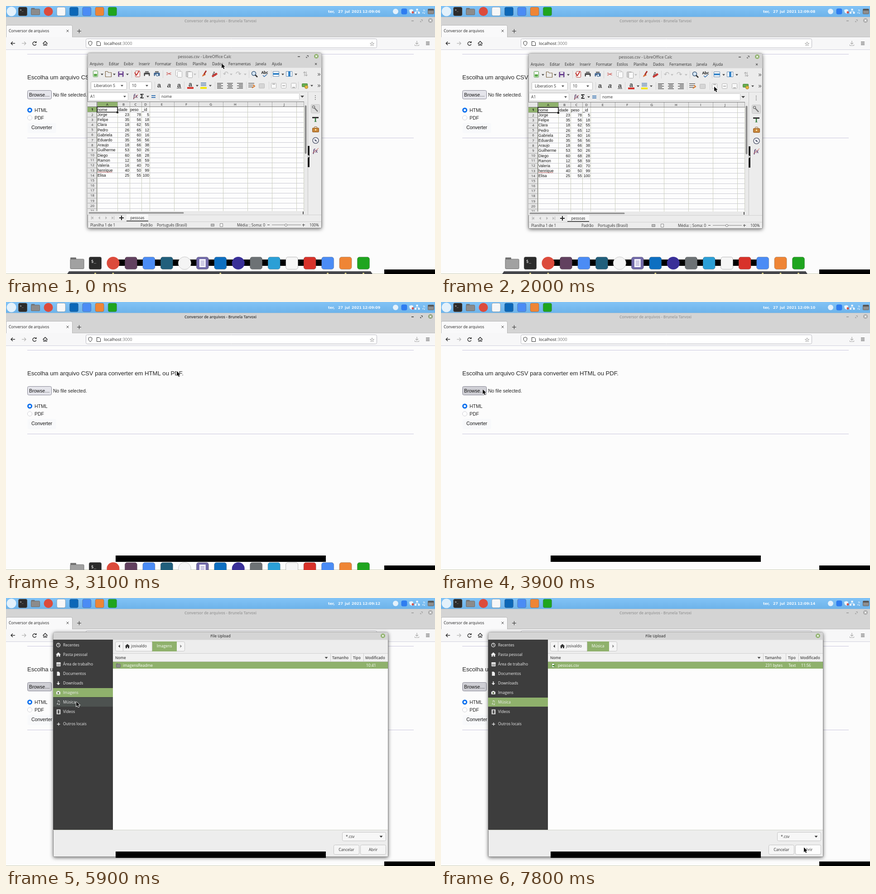
These frames come from a looping animation (947x592 px, 8000 ms). An HTML page with a canvas:

```html
<!DOCTYPE html>
<html lang="pt-BR">
<head>
<meta charset="utf-8">
<style>
html, body { margin: 0; width: 100%; height: 100%; overflow: hidden; background: #fcfcfc; }
canvas { display: block; }
</style>
</head>
<body>
<canvas id="stage" width="947" height="592"></canvas>
<script>
const W = 947, H = 592, LOOP = 8000;
const UI = '"Open Sans", "Noto Sans", sans-serif';
const ARIAL = '"Liberation Sans", Arial, sans-serif';
const SYM = '"DejaVu Sans", sans-serif';
const GREEN = '#8fb16c', DARK = '#2e2e2e', GREY = '#a9a9a9';
const stage = document.getElementById('stage').getContext('2d');
let g = stage;

// Drawing helpers; text is placed by its visual centre line.
function rect(x, y, w, h, fill) { g.fillStyle = fill; g.fillRect(x, y, w, h); }
function box(x, y, w, h, r, fill, line, lw = 1) {
  g.beginPath();
  g.roundRect(x + .5, y + .5, w - 1, h - 1, r);
  if (fill) { g.fillStyle = fill; g.fill(); }
  if (line) { g.strokeStyle = line; g.lineWidth = lw; g.stroke(); }
}
function disc(x, y, r, fill, line, lw = 1) {
  g.beginPath();
  g.arc(x, y, r, 0, 7);
  if (fill) { g.fillStyle = fill; g.fill(); }
  if (line) { g.strokeStyle = line; g.lineWidth = lw; g.stroke(); }
}
function path(points, line, lw = 1, fill) {
  g.beginPath();
  points.forEach(([x, y]) => g.lineTo(x, y));
  if (fill) { g.closePath(); g.fillStyle = fill; g.fill(); }
  if (line) { g.strokeStyle = line; g.lineWidth = lw; g.stroke(); }
}
function text(s, x, y, size, color = DARK, align = 'left', font = UI, style = '') {
  g.font = `${style} ${size}px ${font}`;
  g.textAlign = align;
  g.fillStyle = color;
  g.fillText(s, x, Math.round(y + size * .35));
}
const sym = (s, x, y, size, color = DARK) => text(s, x, y, size, color, 'center', SYM);
const down = (x, y, c = '#444', r = 3) => path([[x - r, y - r / 2], [x + r, y - r / 2], [x, y + r / 2 + .5]], null, 0, c);
const side = (x, y, d, c) => path([[x + d * 2, y], [x - d * 1.5, y - 3.5], [x - d * 1.5, y + 3.5]], null, 0, c);
const vline = (x, y0, y1, c) => rect(x, y0, 1, y1 - y0, c);

function layer(draw) {
  const c = document.createElement('canvas');
  c.width = W; c.height = H;
  g = c.getContext('2d');
  draw();
  g = stage;
  return c;
}

function frame(x, y, w, h, fill) {
  g.save();
  g.shadowColor = 'rgba(0,0,0,.6)';
  g.shadowBlur = 9;
  g.shadowOffsetY = 2;
  box(x, y, w, h, [4, 4, 1, 1], fill);
  g.restore();
  box(x, y, w, h, [4, 4, 1, 1], null, '#8a8a8a');
}
function windowButtons(min, max, y, c) {
  rect(min - 2, y - 1, 5, 1.5, c);
  path([[max - 1, y - 2.5], [max + 2, y - 2.5], [max + 2, y + .5]], c, 1.2);
  path([[max - 2, y], [max - 2, y + 2], [max, y + 2]], c, 1.2);
}
function closeButton(x, y, c = GREEN) {
  disc(x, y, 5, c);
  path([[x - 2, y - 2], [x + 2, y + 2]], '#fff', 1.2);
  path([[x + 2, y - 2], [x - 2, y + 2]], '#fff', 1.2);
}
function folder(x, y, w, h, c = '#8b8b8b') {
  box(x, y, w * .45, h * .4, 1, '#6e6e6e');
  box(x, y + h * .14, w, h * .86, 1.5, c, '#6f6f6f');
}
function house(x, y, c) {
  path([[x, y - 5], [x + 5.5, y], [x + 4, y], [x + 4, y + 4.5], [x + 1, y + 4.5], [x + 1, y + 1.5],
    [x - 1, y + 1.5], [x - 1, y + 4.5], [x - 4, y + 4.5], [x - 4, y], [x - 5.5, y]], null, 0, c);
}
function terminal(x, y, s) {
  box(x - s / 2, y - s / 2, s, s, 3, '#2b2b2b', '#555');
  text(s > 22 ? '$_' : '>_', x - s * .33, y - s * .17, s * .34, '#fff', 'left', '"DejaVu Sans Mono", monospace');
}
const tile = (x, y, s, c) => box(x - s / 2, y - s / 2, s, s, s * .17, c, 'rgba(70,70,70,.35)');

function panel(second) {
  const sky = g.createLinearGradient(0, 0, 0, 24);
  sky.addColorStop(0, '#82c3f6');
  sky.addColorStop(1, '#6db3ea');
  rect(0, 0, W, 24, sky);
  disc(12, 12, 10.5, '#e3f1fb');
  terminal(37, 12, 20);
  folder(55, 4, 20, 16);
  disc(93.5, 12, 10, '#dc4b3c');
  ['#f7f7f7', '#0c67b7', '#4b8cf5', '#ef8535', '#1fa51f'].forEach((c, i) => tile(121.7 + i * 28.3, 12, 20, c));
  const ss = String(second).padStart(2, '0');
  [['ter,', 711], ['27', 733], ['jul', 748], ['2021', 763], [`12:09:${ss}`, 787]].forEach(
    ([s, x]) => text(s, x, 12, 7.9, '#f4faff', 'left', SYM, 'bold'));
  disc(860, 12, 6, '#e4f1fb');
  box(872, 5, 14, 14, 4, '#2f7df0');
  path([[895, 7], [899, 8.5], [898, 14], [895, 17], [891, 14], [890, 8.5]], null, 0, '#eef6fc');
  disc(898, 14, 2.5, '#d9544c');
  [[907, 7], [903.5, 14], [911, 14]].forEach(([x, y]) => rect(x - 1.5, y - 1, 4, 4, '#eef6fc'));
  path([[904.5, 14], [904.5, 12], [911.5, 12], [911.5, 14]], '#eef6fc');
  sym('♫', 922, 12, 11, '#eef6fc');
  box(931, 6, 14, 12, 1, '#8d8d8d', '#666');
  rect(932, 7, 12, 3, '#555');
}

function browser(focused, hover) {
  const ink = focused ? '#333' : '#989898';
  rect(0, 24, W, 45, '#d4d4d4');
  rect(0, 24, W, 1, '#c3c9cd');
  text('Conversor de arquivos - Brunela Tarvoxi', 473.5, 33, 8.3, ink, 'center', UI, '600');
  windowButtons(897, 917, 33, ink);
  closeButton(937, 32, focused ? '#8d9f78' : '#aaa');
  box(0, 42, 147, 28, [3, 3, 0, 0], '#f9f9fa', '#b5b5b5');
  text('Conversor de arquivos', 6, 55, 8.5, '#222');
  path([[133.5, 52.5], [138.5, 57.5]], '#444');
  path([[138.5, 52.5], [133.5, 57.5]], '#444');
  rect(157, 55, 9, 1, DARK);
  vline(161, 51, 60, DARK);
  rect(0, 69, W, 27, '#f7f7f8');
  rect(147, 68, 800, 1, '#bdbdbd');
  rect(0, 96, W, 1, '#d0d0dc');
  const arrow = (x, d, c) => {
    path([[x - 4.5, 82.5], [x + 4.5, 82.5]], c, 1.3);
    path([[x + d * .7, 78.7], [x + d * 4.5, 82.5], [x + d * .7, 86.3]], c, 1.3);
  };
  arrow(15.5, -1, '#222');
  arrow(39.5, 1, '#b5b5b5');
  g.beginPath(); g.arc(63, 83, 4, .4, 5.6); g.strokeStyle = '#222'; g.lineWidth = 1.3; g.stroke();
  path([[67.5, 77.5], [67.5, 81.5], [63.5, 81.5]], null, 0, '#222');
  path([[81.5, 83], [86.5, 78], [91.5, 83]], '#222', 1.3);
  path([[83, 82], [83, 87], [85.5, 87], [85.5, 84], [87.5, 84], [87.5, 87], [90, 87], [90, 82]], '#222', 1.1);
  box(176, 72, 643, 21, 3, '#fff', '#b9b9c0');
  path([[186, 77.5], [190, 79.5], [189.5, 84], [186, 88], [182.5, 84], [182, 79.5], [186, 77.5]], '#333');
  path([[200.5, 78.5], [206, 78.5], [208.5, 81], [208.5, 87.5], [200.5, 87.5], [200.5, 78]], '#333');
  text('localhost', 216, 83, 9.2, '#222');
  text(':3000', 255, 83, 9.2, '#777');
  sym('☆', 808, 83, 13, '#333');
  path([[907, 77], [907, 84]], '#aaa', 1.2);
  path([[904, 81.5], [907, 84.5], [910, 81.5]], '#aaa', 1.2);
  path([[902.5, 85], [902.5, 87.5], [911.5, 87.5], [911.5, 85]], '#aaa');
  [79, 82, 85].forEach(y => rect(927, y, 8, 1, '#333'));

  rect(0, 97, W, 495, '#fcfcfc');
  [106, 291].forEach(y => rect(47, y, 853, 1, '#c9c6dd'));
  const page = (s, x, y, size = 10.5, c = '#222') => text(s, x, y, size, c, 'left', ARIAL);
  page('Escolha um arquivo CSV para converter em HTML ou PDF.', 47, 157.5, 13.1);
  box(47, 186, 54, 20, 3, hover ? '#cfcfd5' : '#e5e5eb', '#8b8b98');
  page('Browse…', 51, 196.5, 10.5, '#111');
  page('No file selected.', 104, 196.5);
  disc(52.5, 230, 4, '#fff', '#0b6fee', 3);
  disc(52.5, 247, 5, '#fff', '#cfcfd5');
  page('HTML', 63, 230);
  page('PDF', 63, 247);
  box(47, 258, 64, 23, 3, '#f8f9fb');
  page('Converter', 56, 268.7, 10.5, '#111');
  rect(0, 591, W, 1, '#c9cdb4');
}

const PEOPLE = 'Jorge,23,78,5;Felipe,35,56,18;Clara,18,62,55;Pedro,26,65,12;Gabriela,25,60,16;Eduardo,35,56,56;Araujo,18,66,38;Guilherme,53,50,26;Diego,60,68,28;Ramon,12,58,59;Valeria,16,40,70;henrique,40,50,99;Elisa,25,55,100'
  .split(';').map(r => r.split(','));
const COLS = [201, 246, 273, 299, 317, 371, 425, 479, 533, 587, 641, 657];
const ROW = 11.18;

function toolbars() {
  const page = (x, y, c, fill = '#fafafa') => box(x - 5, y - 7, 11, 14, 1, fill, c);
  // File, print and clipboard
  page(197, 150, '#4a9a3a'); rect(194, 150, 7, 5, '#56a845');
  path([[219.5, 156], [219.5, 144.5], [224, 144.5], [226, 147], [232.5, 147], [232.5, 156.5], [219, 156.5]], '#7d6644', 1.2);
  box(247, 144, 13, 13, 1, '#69418f'); rect(250, 145, 7, 4, '#eee'); rect(250, 152, 7, 5, '#ddd');
  page(290, 150, '#b8463e'); path([[284, 147], [288, 153], [294, 143]], '#c32f2b', 2);
  for (const [x, c] of [[311, '#444'], [333, '#395f8c']]) {
    box(x - 7, 147, 14, 8, 1, c); rect(x - 4, 144, 8, 3, '#777'); rect(x - 4, 151, 8, 6, '#f5f5f5');
  }
  disc(334, 152, 3, '#cde2f3', '#274c77');
  sym('✂', 360, 150, 15, '#c8413c');
  page(379, 148, '#b5b5b5'); page(383, 151, '#b5b5b5');
  box(397, 144, 11, 13, 1, '#cfcfcf', GREY); page(406, 152, GREY);
  path([[433, 156], [441, 152], [439, 149], [434, 152]], null, 0, '#d96d36'); path([[437, 151], [442, 143]], '#a9342c', 3);
  text('A', 455, 149, 13, '#333', 'left', ARIAL); path([[455, 156], [466, 149]], '#c83a36', 4);
  sym('↶', 485, 150, 15, '#b9b9b9'); sym('↷', 513, 150, 15, '#b9b9b9');
  disc(547, 149, 4.5, '#d5e6f5', '#3c5b7c', 1.5); path([[550, 152], [555, 157]], '#333', 2.5);
  text('Abc', 571, 147, 8.3, '#222', 'center', UI, 'bold'); path([[567, 153], [570, 156], [576, 151]], '#3370b0', 1.5);
  for (const x of [596, 625]) {
    box(x - 7, 144, 14, 12, 0, '#fff', '#6487ab');
    x < 600 ? rect(x - 7, 148, 14, 4, '#3a87c9') : rect(x - 2, 144, 5, 12, '#3a87c9');
  }
  sym('⇅', 661, 150, 14, GREY);
  [212, 239, 268, 611, 640].forEach(x => down(x, 151));
  [417, 497, 528].forEach(x => down(x, 151, '#bbb'));
  [277, 346, 425, 473, 536, 585].forEach(x => vline(x, 142, 159, '#d4d4d4'));
  // Formatting
  box(187, 167, 80, 18, 2, '#fff', '#bdbdbd'); text('Liberation S', 194, 176, 8.5); down(256, 176);
  box(272, 167, 50, 18, 2, '#fff', '#bdbdbd'); text('10', 278, 176, 8.5); down(311, 176);
  ['bold', 'italic bold', 'bold'].forEach((s, i) => text('a', 338 + i * 22, 175, 15, '#4a4a4a', 'center', ARIAL, s));
  rect(377, 181, 10, 1, '#444');
  text('a', 407, 173, 14, '#4a4a4a', 'center', ARIAL, 'bold'); rect(400, 179, 14, 4, '#d4362e');
  [169, 172, 175].forEach(y => rect(430, y, 12, 1.4, '#527ba8')); rect(429, 179, 14, 4, '#f3e500');
  [472, 494, 516].forEach((x, n) => {
    for (let i = 0; i < 5; i++) rect(x - 6 + (i % 2 ? n * 2 : 0), 170 + i * 2.8, i % 2 ? 9 : 13, 1.2, '#444');
  });
  [170, 174, 178].forEach(y => rect(535, y, 13, 1.3, '#555')); path([[545, 174], [549, 177], [543, 181]], '#e07b29', 2);
  box(558, 171, 13, 11, 1, '#d5d5d5', '#bcbcbc');
  [591, 613, 635].forEach((x, i) => { box(x - 6, 170, 12, 12, 1, '#f8f8f8', '#b5b5b5'); rect(x - 3, 172 + i * 3.5, 6, 1.2, '#888'); });
  box(653, 171, 13, 8, 1, '#67ad50', '#48853a'); disc(663, 179, 3.5, '#e7b844', '#a88227');
  [422, 451, 675].forEach(x => down(x, 176));
  [328, 393, 461, 530, 580, 645].forEach(x => vline(x, 167, 184, '#d4d4d4'));
  [150, 175].forEach(y => text('»', 691, y, 15, '#555', 'center'));
}

function drawCalc() {
  frame(180, 103, 517, 388, '#ececec');
  box(180, 103, 517, 34, [4, 4, 0, 0], '#d5d5d5');
  text('pessoas.csv - LibreOffice Calc', 438.5, 112, 8.7, '#444', 'center');
  windowButtons(646, 665, 112, '#444');
  closeButton(685, 111);
  [['Arquivo', 185], ['Editar', 227], ['Exibir', 260], ['Inserir', 293], ['Formatar', 329], ['Estilos', 375], ['Planilha', 412],
    ['Dados', 455], ['Ferramentas', 491], ['Janela', 551], ['Ajuda', 587]].forEach(([s, x]) => text(s, x, 128.5, 8.3));
  sym('✕', 684, 128, 8);
  toolbars();
  rect(181, 189, 515, 1, '#d3d3d3');

  box(181, 191, 89, 18, 2, '#fff', '#c9c9c9');
  text('A1', 186, 200.5, 8.5);
  down(262, 200);
  text('fx', 286, 199, 12, '#59436c', 'center', '"Liberation Serif", serif', 'italic bold');
  path([[281, 205], [291, 196]], '#c34b45');
  text('Σ', 300, 199, 14, '#333', 'center', SYM, 'bold');
  down(313, 200);
  rect(321, 197, 9, 2, '#3e78b5'); rect(321, 201, 9, 2, '#3e78b5');
  box(338, 192, 310, 16, 1, '#fff', '#c9c9c9');
  text('nome', 343, 200, 8.5);
  down(654, 200, '#444', 4);

  g.save();
  g.beginPath(); g.rect(180, 211, 478, 242); g.clip();
  rect(201, 223, 457, 230, '#fdfdfd');
  rect(180, 211, 478, 12, '#e6e6e6');
  rect(180, 223, 21, 230, '#e6e6e6');
  rect(201, 211, 45, 12, GREEN);
  rect(180, 223, 21, 11, GREEN);
  for (let i = 1; i <= 21; i++) {
    const y = Math.round(223 + i * ROW);
    rect(201, y, 457, 1, '#c9c9d2');
    rect(180, y, 21, 1, '#aaa');
    text(i, 190.5, 228.7 + (i - 1) * ROW, 7.8, i === 1 ? '#111' : '#333', 'center', UI, i === 1 ? 'bold' : '');
  }
  COLS.forEach((x, i) => {
    vline(x, 223, 453, '#cdd0c0');
    vline(x, 211, 223, '#aaa');
    if (i < 10) text('ABCDEFGHIJ'[i], (x + COLS[i + 1]) / 2, 217.5, 7.8, '#222', 'center');
  });
  rect(180, 211, 478, 1, '#777'); rect(180, 222, 478, 1, '#777'); vline(200, 211, 453, '#777');
  const cell = (s, x, row, align) => text(s, x, 228.9 + row * ROW, 8.6, '#111', align, ARIAL);
  ['nome', 'idade', 'peso', '_id'].forEach((s, i) => cell(s, COLS[i] + 1, 0, 'left'));
  PEOPLE.forEach((person, r) => person.forEach(
    (s, i) => cell(s, i ? COLS[i + 1] - 1 : 202, r + 1, i ? 'right' : 'left')));
  path(Array.from({ length: 18 }, (_, i) => [202 + i * 1.9, 366.5 + i % 2]), '#d9564e', .8);
  g.strokeStyle = '#111'; g.lineWidth = 1.5; g.strokeRect(201, 223, 45, 11.5);
  rect(244, 233, 4, 4, '#111');
  g.restore();

  rect(658, 211, 8, 242, '#e9e9e9');
  box(659, 219, 5, 108, 2, '#8d8d8d');
  rect(180, 453, 486, 8, '#e9e9e9');
  box(182, 455, 211, 4, 2, '#8d8d8d');
  rect(655, 454, 2, 6, '#555');
  vline(666, 190, 461, '#c4c4c4');
  rect(666, 309, 4, 47, '#1c1c1c');
  side(668, 332, 1, '#fff');

  sym('⋮', 683, 202, 12);
  box(673, 217, 20, 20, 2, '#dcdcdc', '#c5c5c5');
  path([[678, 222], [688, 233]], '#777', 2.5); disc(679, 223, 2.5, '#eee', '#777', 1.5);
  text('T', 683, 250, 16, '#347f3f', 'center', '"Liberation Serif", serif', 'bold'); rect(676, 245, 14, 3, '#333');
  box(676, 269, 15, 10, 1, '#c6843a', '#8d5920'); box(680, 266, 7, 4, 1, null, '#8d5920'); rect(682, 272, 3, 3, '#ffe3a0');
  disc(683.5, 297, 6.5, '#f4f4f8', '#5b6175', 1.5);
  path([[680.5, 294], [685, 296], [686.5, 300], [682, 298]], null, 0, '#5b6175');
  text('fx', 683, 319, 13, '#5d4374', 'center', '"Liberation Serif", serif', 'italic bold'); path([[677, 325], [690, 314]], '#c34b45');

  rect(181, 461, 515, 1, '#d0d0d0');
  [[191, -1], [206, -1], [221, 1], [235, 1]].forEach(([x, d]) => side(x, 468, d, '#b4b4b4'));
  vline(188, 464, 472, '#b4b4b4'); vline(238, 464, 472, '#b4b4b4');
  rect(250, 467, 10, 2, '#222'); rect(254, 463, 2, 10, '#222');
  rect(266, 461, 48, 14, '#f9f9f9'); rect(266, 474, 48, 1.5, '#222');
  text('pessoas', 290, 468, 8.2, '#222', 'center');
  rect(181, 476, 515, 1, '#d0d0d0');
  [['Planilha 1 de 1', 186], ['Padrão', 297], ['Português (Brasil)', 333], ['Média: ; Soma: 0', 510], ['100%', 670]]
    .forEach(([s, x]) => text(s, x, 484, 8.1));
  box(452, 481, 8, 6, 0, '#bbb', '#888'); box(472, 480, 7, 8, 0, '#f8f8f8', '#888');
  rect(577, 483, 5, 1, '#444'); rect(587, 483, 64, 1, '#888'); disc(618, 484, 2.5, '#fff', '#777');
  rect(654, 483, 6, 1, '#444'); vline(656, 481, 487, '#444');
}

const PLACES = ['Recentes', 'Pasta pessoal', 'Área de trabalho', 'Documentos', 'Downloads', 'Imagens', 'Música', 'Vídeos', 'Outros locais'];
const placeY = i => i === 8 ? 278.5 : 104 + i * 21.07;

function placeIcon(i, x, y, c = '#eee') {
  if (i === 0) { disc(x, y, 4, null, c, 1.3); path([[x, y - 2.5], [x, y], [x + 2, y + 1]], c); }
  if (i === 1) house(x, y, c);
  if (i === 2) { box(x - 4, y - 4, 9, 9, 0, '#aaa', c); rect(x - 4, y - 4, 9, 3, c); }
  if (i === 3) path([[x - 3, y - 4.5], [x + 1, y - 4.5], [x + 3.5, y - 2], [x + 3.5, y + 4.5], [x - 3, y + 4.5]], null, 0, c);
  if (i === 4) { rect(x - 1, y - 4, 2, 5, c); path([[x - 4, y], [x + 4, y], [x, y + 4]], null, 0, c); }
  if (i === 5) { box(x - 5, y - 3, 10, 7, 1, c); rect(x - 2, y - 4, 4, 2, c); disc(x, y + .5, 2, '#5d6f49'); }
  if (i === 6) sym('♫', x, y, 12, c);
  if (i === 7) { box(x - 3.5, y - 5, 8, 10, 0, null, c, 1.5); vline(x - 2, y - 4, y + 4, c); vline(x + 2, y - 4, y + 4, c); }
  if (i === 8) { rect(x - 3, y - .5, 7, 1.3, c); rect(x, y - 3.5, 1.3, 7, c); }
}

function drawDialog(place) {
  const music = place === 6;
  frame(104, 75, 740, 497, '#ededed');
  box(104, 75, 740, 18, [4, 4, 0, 0], '#d5d5d5');
  text('File Upload', 473.5, 84, 8.3, '#444', 'center', UI, '600');
  closeButton(832, 83.5);
  rect(104, 92, 132, 421, '#3d3d3d');
  rect(104, Math.round(placeY(place)) - 10, 132, 20, GREEN);
  PLACES.forEach((s, i) => {
    placeIcon(i, 115.5, placeY(i));
    text(s, 126, placeY(i), 8.5, '#efefef');
  });
  const tabEnd = music ? 371 : 377;
  box(241, 96, tabEnd - 223, 22, 3, '#f5f5f5', '#c6c6c6');
  rect(322, 96, tabEnd - 322, 22, GREEN);
  [258, 322].forEach(x => vline(x, 97, 117, '#c6c6c6'));
  side(250, 106.5, -1, '#333');
  side(tabEnd + 9, 106.5, 1, '#888');
  house(268, 106.5, '#333');
  text('josivaldo', 276, 106.5, 8.5);
  text(PLACES[place], (322 + tabEnd) / 2, 106.5, 8.5, '#fff', 'center');

  rect(236, 122, 607, 391, '#fdfdfd');
  rect(236, 122, 607, 19, '#f1f1f1');
  rect(236, 122, 607, 1, '#d0d0d0'); rect(236, 140, 607, 1, '#c9c9c9');
  const head = (s, x) => text(s, x, 132, 8.1, '#444', 'left', UI, '600');
  const sizeX = music ? 711 : 716;
  head('Nome', 241); head('Tamanho', sizeX + 4); head('Tipo', 766); head('Modificado', 793);
  down(sizeX - 9, 132, '#444', 3.5);
  [sizeX, 761, 789].forEach(x => vline(x, 122, 140, '#cfcfcf'));
  rect(236, 141, 607, 15, GREEN);
  const item = (s, x) => text(s, x, 149, 8.5, '#fff');
  if (music) {
    box(244, 144, 7, 10, 1, '#f5f5f5', '#55803a'); rect(246, 148, 4, 3, '#4a9a3a');
    item('pessoas.csv', 258); item('231 bytes', 716); item('Text', 767); item('11:56', 795);
  } else {
    folder(243, 144, 10, 10);
    item('imagensReadme', 258); item('10:41', 795);
  }
  rect(104, 512, 739, 1, '#cfd2c8');
  box(742, 517, 97, 20, 3, '#f7f7f7', '#c4c4c4');
  text('*.csv', 750, 527, 8.5);
  down(828, 527, '#333', 3.5);
  dialogButton('Cancelar', 723, '#f5f5f5');
  dialogButton('Abrir', 782, '#f5f5f5');
}
function dialogButton(label, x, fill) {
  box(x, 545, 57, 22, 3, fill, '#c4c4c4');
  text(label, x + 28.5, 556, 8.5, DARK, 'center');
}

function drawDock() {
  path([[139, 586], [805, 586], [809, 592], [135, 592]], null, 0, '#45464b');
  const at = i => 157.5 + i * 39.47;
  folder(at(0) - 16, 555, 31, 26, '#a1a1a1');
  terminal(at(1), 568, 28);
  const fills = { 3: '#62415f', 4: '#4b8cf5', 5: '#215f7c', 7: '#7169a9', 8: '#0d6fc1', 10: '#6d7275', 11: '#2b9fd6',
    12: '#f6f6f6', 13: '#d8322a', 14: '#4b8cf5', 15: '#ef8535', 16: '#1fa51f' };
  for (const i in fills) tile(at(+i), 568, 28, fills[i]);
  disc(at(2), 568, 14, '#dc4b3c');
  disc(at(6), 568, 14, '#f4f4f4', '#c9c9c9');
  disc(at(9), 568, 14, '#3a3098');
  rect(at(7) - 7, 559, 14, 18, '#f2f0fa');
  for (let y = 563; y < 575; y += 3) rect(at(7) - 4, y, 8, 1, '#8a82bb');
  [1, 2, 8, 14, 15, 16].forEach(i => disc(at(i), 591, 2, '#d8cf8a'));
}

const calc = layer(drawCalc);
const dialogs = { 5: layer(() => drawDialog(5)), 6: layer(() => drawDialog(6)) };
const dock = layer(drawDock);

// Pointer stops: time, x, y
const POINTER = [[0, 476, 127], [300, 463, 112], [400, 462, 111], [800, 475, 112], [1000, 475, 112], [1800, 590, 194],
  [1900, 596, 186], [2400, 659, 110], [2800, 659, 110], [3400, 95, 195], [3600, 92, 193], [4000, 92, 193], [4500, 156, 214],
  [5600, 156, 214], [5900, 155, 229], [6500, 155, 229], [7400, 830, 513], [7700, 801, 551], [8000, 801, 551]];

const clamp = v => Math.max(0, Math.min(1, v));
const span = (t, a, b) => clamp((t - a) / (b - a));
const ease = p => p * p * (3 - 2 * p);

function pointerAt(t) {
  const i = Math.max(1, POINTER.findIndex(k => k[0] >= t));
  const [t0, x0, y0] = POINTER[i - 1], [t1, x1, y1] = POINTER[i];
  const p = ease(span(t, t0, t1));
  return [Math.round(x0 + (x1 - x0) * p), Math.round(y0 + (y1 - y0) * p)];
}
function drawPointer(x, y, grabbing) {
  if (grabbing) {
    box(x - 4, y - 1, 10, 7, 3, '#111');
    [-2, 0, 2, 4].forEach(d => disc(x + d + .5, y - 1, 1.5, '#111'));
    return;
  }
  const shape = [[0, 0], [0, 10.5], [2.5, 8.3], [4.3, 12.2], [6.2, 11.3], [4.5, 7.6], [7.8, 7.3]].map(([a, b]) => [x + a, y + b]);
  path([...shape, shape[0]], '#fff', 1.6);
  path(shape, null, 0, '#111');
}
function drawScaled(image, from, to, scale, alpha) {
  g.save();
  g.globalAlpha = alpha;
  g.translate(...to);
  g.scale(scale, scale);
  g.drawImage(image, -from[0], -from[1]);
  g.restore();
}

function render(now) {
  const t = Math.floor(now % LOOP / 100) * 100;
  const [px, py] = pointerAt(t);
  g.clearRect(0, 0, W, H);
  browser(t >= 2800 && t < 3900, t >= 3600);
  panel(6 + Math.floor((t + 700) / 1000));

  if (t < 3000) {
    // The window is dragged, then shrinks towards the launcher in the panel.
    const drag = span(t, 400, 800), shrink = span(t, 2700, 2969);
    const x = 438 + Math.round(13 * drag), y = 297 + Math.round(drag);
    drawScaled(calc, [438, 297], [x + (224 - x) * shrink, y + (4 - y) * shrink], 1 - shrink, (1 - shrink) * .95 ** (shrink * 2));
    if (t >= 2600 && t < 2800) {
      box(652, 105, 12, 12, 6, '#bfbfbf');
      rect(657, 112, 5, 1.5, '#333');
    }
  }
  if (t >= 4000) {
    const open = ease(span(t, 3900, 4200)), place = t < 6300 ? 5 : 6, centre = [473.5, 323.5];
    drawScaled(dialogs[place], centre, centre, .8 + .2 * open, open);
    const hovered = PLACES.findIndex((_, i) => px > 104 && px < 236 && Math.abs(py + 1 - placeY(i)) < 10.5);
    if (open === 1 && hovered >= 0 && hovered !== place) {
      const y = placeY(hovered);
      rect(104, Math.round(y) - 10, 132, 20, '#4d5250');
      placeIcon(hovered, 115.5, y);
      text(PLACES[hovered], 126, y, 8.5, '#efefef');
    }
    if (px > 782 && px < 839 && py > 544) dialogButton('Abrir', 782, '#fdfdfd');
  }
  rect(242, 560, 464, 14, '#000');
  if (t < 3400) g.drawImage(dock, 0, Math.round(42 * ease(span(t, 2900, 3300))));
  rect(835, 582, 112, 10, '#000');
  drawPointer(px, py, t >= 400 && t < 1000);
}

(function tick() {
  render(performance.now());
  requestAnimationFrame(tick);
})();
</script>
</body>
</html>
```
